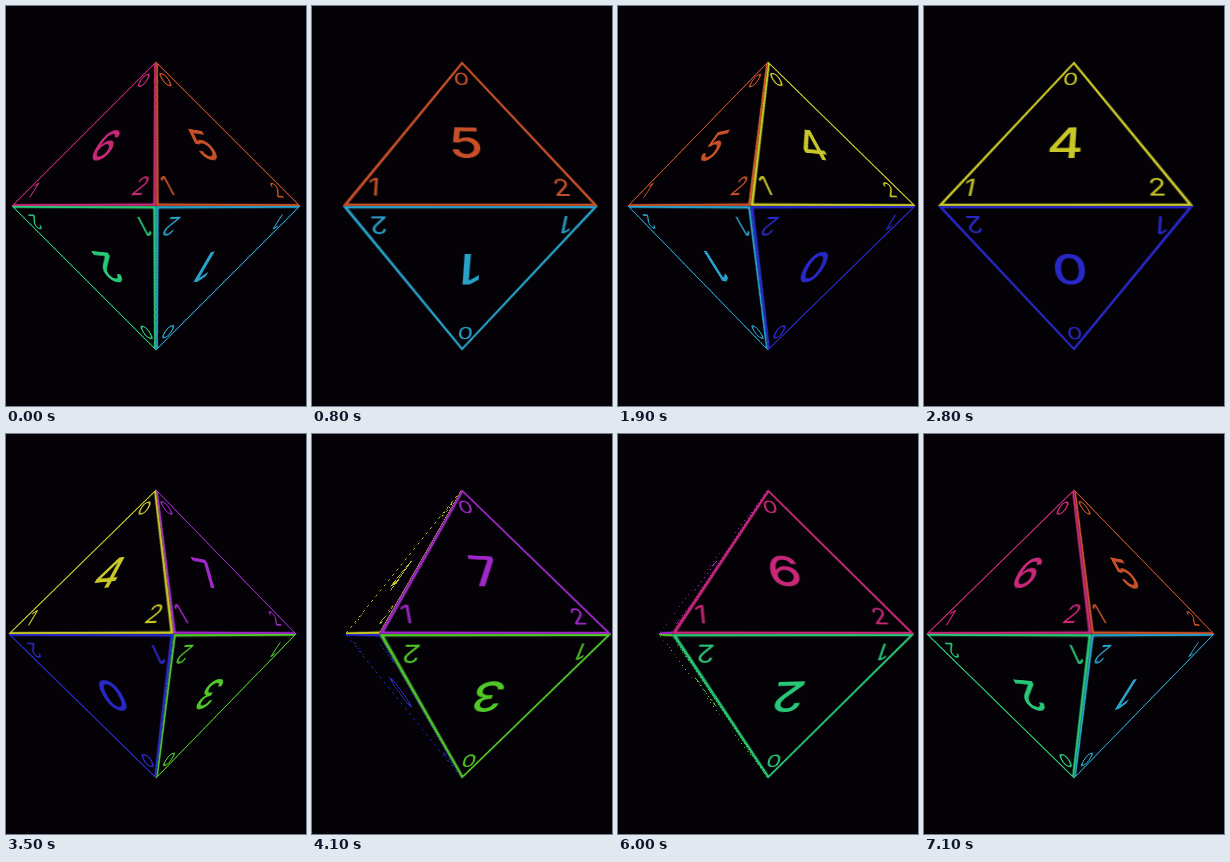
These frames come from a looping animation (300 px wide and 400 px high, 7.2 s). An HTML page:

```html
<!DOCTYPE html>
<html lang="en">
<head>
<meta charset="utf-8">
<title>Octahedron</title>
<style>
  html, body { margin: 0; width: 100%; height: 100%; overflow: hidden; background: #040206; }
  #stage { position: absolute; width: 300px; height: 400px; overflow: hidden; perspective: 500px; }
  #solid { position: absolute; left: 150px; top: 200px; width: 0; height: 0; transform-style: preserve-3d; }
  svg {
    position: absolute;
    left: -108px;
    top: -4px;
    transform-origin: 108px 4px;
    backface-visibility: hidden;
  }
  polygon { fill: none; stroke: currentColor; }
  text { font: 24px Inter, sans-serif; text-anchor: middle; fill: currentColor; }
  .big { font-size: 49px; font-weight: 550; }
</style>
</head>
<body>
<div id="stage"><div id="solid"></div></div>
<script>
const LOOP = 7200, STEP = 100;
const RADIUS = 144.6, LINE = 2.4;
const HALF = RADIUS / Math.SQRT2;         // half of a face's side
const HEIGHT = HALF * Math.sqrt(3);
const TILT = Math.asin(1 / Math.sqrt(3)); // lean of a face from vertical
const solid = document.getElementById('solid');

// Triangle inset by half a line, so the stroke ends exactly on the face's edges
const base = HEIGHT - LINE / 2, side = HALF - LINE * Math.sqrt(3) / 2;
const outline = `<polygon stroke-width="${LINE}" points="0,${LINE} ${side},${base} ${-side},${base}"/>`;

const label = (x, y, text, cls = '') => `<text class="${cls}" x="${x}" y="${y}">${text}</text>`;

function face(number, turn, flip) {
  const transform = `rotateY(${turn}deg) rotateZ(${flip}deg) translateY(${-RADIUS}px) rotateX(${TILT}rad)`;
  return `<svg width="216" height="186" viewBox="-108 -4 216 186"
    style="color:hsl(${240 - 45 * number} 66.7% 47%); transform:${transform}">
    ${outline}
    ${label(-2, 127, number, 'big')}
    ${label(-2, 35.5, 0)}${label(-79, 167, 1)}${label(75, 167, 2)}
  </svg>`;
}

const upper = [5, 4, 7, 6], lower = [1, 0, 3, 2];
solid.innerHTML = upper.map((number, i) => {
  const turn = 45 + 90 * i;
  return face(number, turn, 0) + face(lower[i], turn, 180);
}).join('');

function draw() {
  const time = Math.floor(performance.now() % LOOP / STEP) * STEP;
  solid.style.transform = `rotateY(${-360 * time / LOOP}deg)`;
  requestAnimationFrame(draw);
}
draw();
</script>
</body>
</html>
```
